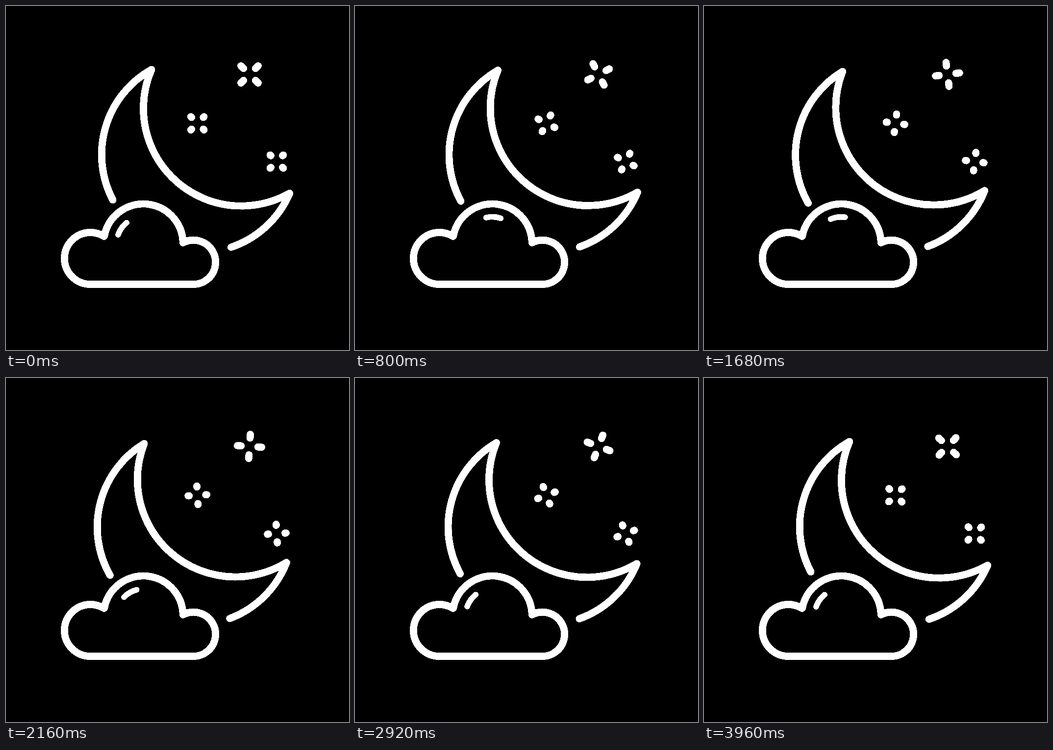
These frames come from a looping animation (700x704 px, 4 s). An HTML page with a canvas:

```html
<!DOCTYPE html>
<html lang="en">
<head>
<meta charset="utf-8">
<title>Cloudy night</title>
<style>
  html, body { margin: 0; width: 100%; height: 100%; overflow: hidden; background: #000; }
  /* High contrast gives the lines their hard edges. */
  canvas { display: block; filter: contrast(8); }
</style>
</head>
<body>
<canvas id="stage" width="700" height="704"></canvas>
<script>
const ctx = document.getElementById('stage').getContext('2d');
const LOOP = 4000;
const STEP = 40;
const LINE = 14.8;
const RAD = Math.PI / 180;

const MOON = {
  outer: { x: 395.2, y: 304.2, r: 200 },
  inner: { x: 480.2, y: 209.5, r: 199.7 },
  tipA: [297, 130], tipB: [578.8, 383.2],
  endA: [218, 397], endB: [459.3, 494],
  pivot: [411, 567], swing: -2
};

const CLOUD = {
  left: { x: 172.3, y: 516.5, r: 53 },
  top: { x: 280.2, y: 486, r: 81 },
  right: { x: 382.5, y: 524.3, r: 45.2 },
  dipA: [200.5, 471], dipB: [361, 484]
};

// Rays run from radius `from` to radius `to`; `spin` is the turn per loop.
const STARS = [
  { x: 497, y: 140, from: 17.3, to: 24.7, spin: 90 },
  { x: 390.7, y: 240, from: 17, to: 19, spin: -90 },
  { x: 552.5, y: 318.4, from: 17, to: 19, spin: -90 }
];

const clamp = v => Math.min(1, Math.max(0, v));
const ease = v => { const s = clamp(v); return s * s * (3 - 2 * s); };
const angleTo = (c, p) => Math.atan2(p[1] - c.y, p[0] - c.x);

function arc(c, a, b, ccw = false) {
  ctx.arc(c.x, c.y, c.r, a, b, ccw);
}

function stroke(width = LINE) {
  ctx.lineWidth = width;
  ctx.stroke();
}

function drawMoon(t) {
  const { outer, inner, tipA, tipB, endA, endB, pivot, swing } = MOON;
  const amount = ease(t < 2000 ? t / 2000 : (LOOP - t) / 2000);
  ctx.save();
  ctx.translate(...pivot);
  ctx.rotate(swing * amount * RAD);
  ctx.translate(-pivot[0], -pivot[1]);
  ctx.beginPath();
  arc(outer, angleTo(outer, endA), angleTo(outer, tipA));
  arc(inner, angleTo(inner, tipA), angleTo(inner, tipB), true);
  arc(outer, angleTo(outer, tipB), angleTo(outer, endB));
  stroke();
  ctx.restore();
}

function drawCloud() {
  const { left, top, right, dipA, dipB } = CLOUD;
  ctx.beginPath();
  arc(left, Math.PI / 2, angleTo(left, dipA));
  arc(top, angleTo(top, dipA), angleTo(top, dipB));
  arc(right, angleTo(right, dipB), Math.PI / 2);
  ctx.closePath();
  stroke();
}

function drawShine(t) {
  const amount = t < 1000 ? ease(t / 1000) : 1 - ease((t - 1000) / 2000);
  const mid = 180 + 35.3 + 64 * amount;
  ctx.beginPath();
  arc({ x: CLOUD.top.x, y: CLOUD.top.y, r: 54.4 }, (mid - 16) * RAD, (mid + 16) * RAD);
  stroke(11.6);
}

function drawStar(star, t) {
  ctx.beginPath();
  for (let i = 0; i < 4; i++) {
    const a = (45 + 90 * i + star.spin * t / LOOP) * RAD;
    const dx = Math.cos(a), dy = Math.sin(a);
    ctx.moveTo(star.x + dx * star.from, star.y + dy * star.from);
    ctx.lineTo(star.x + dx * star.to, star.y + dy * star.to);
  }
  stroke();
}

function draw(t) {
  ctx.fillStyle = '#000';
  ctx.fillRect(0, 0, 700, 704);
  ctx.strokeStyle = '#fff';
  ctx.lineCap = ctx.lineJoin = 'round';
  drawMoon(t);
  drawCloud();
  drawShine(t);
  STARS.forEach(star => drawStar(star, t));
}

const start = performance.now();
function tick() {
  const t = (performance.now() - start) % LOOP;
  draw(Math.floor(t / STEP) * STEP);
  requestAnimationFrame(tick);
}
tick();
</script>
</body>
</html>
```
